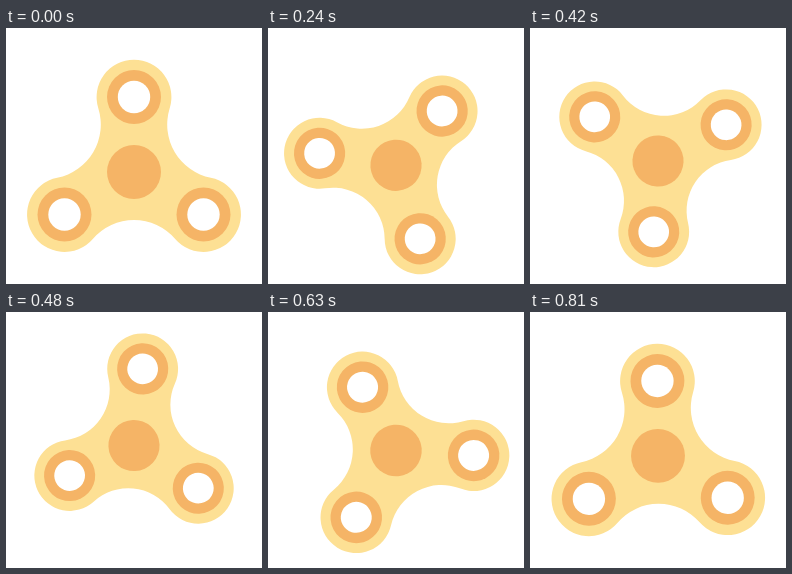
An HTML page that plays this animation: 256 px wide and 256 px high, repeating every 0.84 s.

```html
<!DOCTYPE html>
<html lang="en">
<head>
<meta charset="utf-8">
<title>Spinner</title>
<style>
  html, body { margin: 0; height: 100%; overflow: hidden; background: #fff; }
  svg { display: block; width: 100%; height: 100%; }
</style>
</head>
<body>
<svg viewBox="0 0 256 256">
  <g id="spinner" fill="#f5b466">
    <path fill="#fde094" d="M-35.7-63.7A37.4 37.4 0 1 1 35.7-63.7A54.3 54.3 0 0 0 76.8 5.8A37.4 37.4 0 1 1 41.2 66.9A54.3 54.3 0 0 0-41.2 66.9A37.4 37.4 0 1 1-76.8 5.8A54.3 54.3 0 0 0-35.7-63.7Z"/>
    <circle r="27"/>
    <g id="bearing">
      <circle cy="-75" r="27"/>
      <circle cy="-75" r="16.2" fill="#fff"/>
    </g>
    <use href="#bearing" x="-69.5" y="117.5"/>
    <use href="#bearing" x="69.5" y="117.5"/>
  </g>
</svg>
<script>
const DURATION = 840;
const spinner = document.getElementById('spinner');

const smooth = x => (1 - Math.cos(Math.PI * Math.min(1, x))) / 2;

// cubic-bezier(a, 0, b, 1), solved by bisection
function easeInOut(x, a = 0.605, b = 0.385) {
  let lo = 0, hi = 1, s = 0.5;
  for (let i = 0; i < 24; i++) {
    s = (lo + hi) / 2;
    const bx = 3 * s * (1 - s) ** 2 * a + 3 * s * s * (1 - s) * b + s ** 3;
    if (bx < x) lo = s; else hi = s;
  }
  return s * s * (3 - 2 * s);
}

function draw(now) {
  const t = (now % DURATION) / DURATION;
  const y = 144 - 11 * smooth(2 * Math.min(t, 1 - t));
  const scale = 1 - 0.053 * smooth(3 * Math.min(t, 1 - t));
  const angle = 360 * easeInOut(t);
  spinner.setAttribute('transform', `translate(128 ${y}) rotate(${angle}) scale(${scale})`);
}

let start;
function tick(now) {
  start ??= now;
  draw(now - start);
  requestAnimationFrame(tick);
}
draw(0);
requestAnimationFrame(tick);
</script>
</body>
</html>
```
